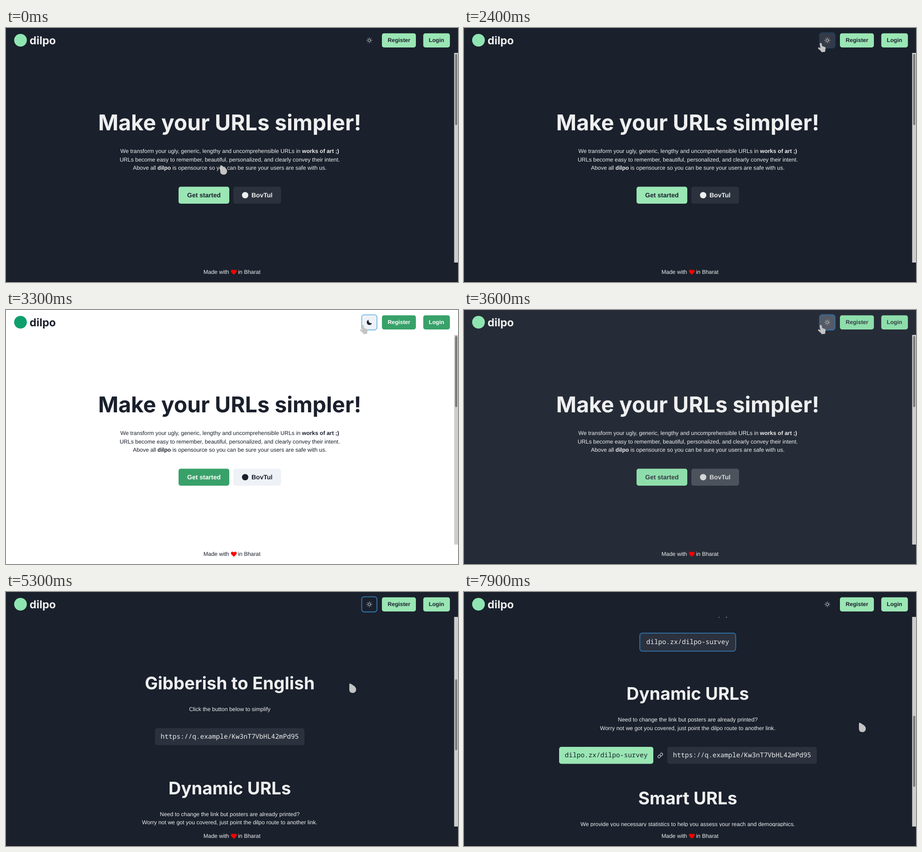
Write an HTML page that moves like this. It is 998 px wide and 561 px high and loops after 8000 ms.

```html
<!DOCTYPE html>
<html lang="en">
<head>
<meta charset="utf-8">
<title>Make your URLs simpler</title>
<style>
  html, body { margin: 0; width: 100%; height: 100%; overflow: hidden; }
  svg { display: block; width: 998px; height: 561px; background: var(--page); }
  text { font: 12.4px "Liberation Sans", Arial, sans-serif; fill: var(--ink);
         text-rendering: geometricPrecision; white-space: pre; }
  .mid { text-anchor: middle; }
  .bold { font-weight: 700; }
  .title { font: 700 38.4px Inter, sans-serif; font-optical-sizing: none; }
  .hero { font-size: 48px; }
  .brand { font-size: 24px; }
  .nav { font-size: 12.47px; font-weight: 700; }
  .cta { font-size: 14.03px; font-weight: 700; }
  .mono { font: 14.53px "Noto Sans Mono", monospace; }
  .onGreen { fill: var(--onGreen); }
  .label { fill: var(--label); }
  .green { fill: var(--green); }
  .grey { fill: #eef2f7; fill-opacity: var(--greyAlpha); }
  .line { fill: none; stroke: var(--label); stroke-linecap: round; }
  .ring { fill: none; stroke: #4299e1; stroke-width: 2.34; }
</style>
</head>
<body>
<svg viewBox="0 0 998 561">
  <defs>
    <clipPath id="view"><rect y="55" width="990" height="463"/></clipPath>
  </defs>

  <g clip-path="url(#view)">
    <g id="content">
      <text class="title hero mid" x="494" y="226">Make your URLs simpler!</text>
      <text class="mid" x="494" y="276">We transform your ugly, generic, lengthy and uncomprehensible URLs in <tspan class="bold">works of art ;)</tspan></text>
      <text class="mid" x="494" y="294.7">URLs become easy to remember, beautiful, personalized, and clearly convey their intent.</text>
      <text class="mid" x="494" y="313.4">Above all <tspan class="bold">dilpo</tspan> is opensource so you can be sure your users are safe with us.</text>
      <rect class="green" x="381" y="350.5" width="112" height="37.4" rx="4.7"/>
      <text class="cta onGreen mid" x="437" y="373.5">Get started</text>
      <rect class="grey" x="502" y="350.5" width="105.3" height="37.4" rx="4.7"/>
      <circle class="label" cx="528" cy="369.3" r="7"/>
      <text class="cta label" x="542" y="373.5">BovTul</text>

      <text class="title mid" x="494" y="565">Gibberish to English</text>
      <text class="mid" x="494" y="613">Click the button below to simplify</text>
      <rect id="linkBox" class="grey" y="651" height="37.4" rx="4.7"/>
      <rect id="linkRing" class="ring" x="388.2" y="649.8" width="211.6" height="39.8" rx="5.8"/>
      <text id="linkText" class="mono label mid" x="494" y="674"></text>

      <text class="title mid" x="494" y="797">Dynamic URLs</text>
      <text class="mid" x="494" y="845">Need to change the link but posters are already printed?</text>
      <text class="mid" x="494" y="863.7">Worry not we got you covered, just point the dilpo route to another link.</text>
      <rect class="green" x="210" y="901" width="208" height="37.4" rx="4.7"/>
      <text class="mono onGreen mid" x="314" y="924">dilpo.zx/dilpo-survey</text>
      <g class="line" transform="translate(427 913.7) scale(.53)" stroke-width="2">
        <path id="chain" d="M10 13a5 5 0 0 0 7.54.54l3-3a5 5 0 0 0-7.07-7.07l-1.72 1.71"/>
        <use href="#chain" transform="rotate(180 12 12)"/>
      </g>
      <rect class="grey" x="449" y="901" width="330" height="37.4" rx="4.7"/>
      <text class="mono label mid" x="614" y="924">https://q.example/Kw3nT7VbHL42mPd95</text>

      <text class="title mid" x="494" y="1028">Smart URLs</text>
      <text class="mid" x="494" y="1076">We provide you necessary statistics to help you assess your reach and demographics.</text>
    </g>
  </g>

  <rect x="989.5" y="55" width="8.5" height="463" fill="#cdcdcd"/>
  <rect id="thumb" x="991.7" width="4.6" height="157" rx="2.3" fill="#787878"/>

  <circle id="logo" cx="32" cy="27" r="14"/>
  <text class="title brand" x="52" y="36">dilpo</text>
  <rect id="themeHover" x="786.5" y="11.7" width="31.4" height="31.2" rx="4.7" fill="#eef2f7"/>
  <rect id="themeRing" class="ring" x="785.4" y="10.6" width="33.6" height="33.4" rx="5.6"/>
  <g id="sun" class="line" transform="translate(802.2 27.2)">
    <circle r="2.8"/>
    <path id="rays"/>
  </g>
  <path id="moon" class="label" d="M808 29.2A5.9 5.9 0 1 1 800.6 21.6A6.2 6.2 0 0 0 808 29.2Z"/>
  <rect class="green" x="830" y="11.7" width="75" height="31.2" rx="4.7"/>
  <text class="nav onGreen mid" x="867.7" y="31">Register</text>
  <rect class="green" x="921.3" y="11.7" width="58.8" height="31.2" rx="4.7"/>
  <text class="nav onGreen mid" x="950.5" y="31">Login</text>

  <text x="436" y="543">Made with</text>
  <path fill="#f00" d="M503 545L498 540.2C494.3 536.3 499 531 503 535.6C507 531 511.7 536.3 508 540.2Z"/>
  <text x="512.3" y="543">in Bharat</text>
  <rect id="edge" y="560" width="998" height="1" opacity=".35"/>

  <path id="spark" d="M2 6V2H5" fill="none" stroke="#6b1a20"/>
  <path id="cursor" fill="#c4c4c4"/>
</svg>
<script>
const LOOP = 8000;
const ARROW = "M0 2.5Q0-.7 2.8.6L10 5Q15.2 9 15.2 13.3A7.5 7.6 0 0 1 8 21Q0 21 0 13.5Z";
const HAND = "M4 2.2Q4 0 6 0Q8 0 8.4 2L9.3 7L15 8.8Q17.2 9.6 17 12L16 16.5V19.6L8 20.6L6.8 18L1 13Q-.7 11 1 9.8Q2.5 9.2 5.6 12Z";

const NAVY = [26, 32, 44], WHITE = [255, 255, 255], PALE = [238, 239, 239];
const MINT = [154, 230, 180], GREEN = [56, 161, 105];

// A move runs from its first visible step and is repainted every `step` ms.
const move = (start, duration, to, step = 100) => ({ start, duration, to, step });

const themeMoves = [move(2500, 300, 1), move(3600, 270, 0, 200)];
const themeRingMoves = [move(2400, 300, .6), move(6600, 200, 0)];
const linkRingMoves = [move(6600, 200, .6)];
const scrollMoves = [move(4400, 400, 262, 200), move(5100, 700, 393, 200), move(7900, 100, 559)];
const cursorMoves = [
  move(500, 500, [769, 255]),
  move(1100, 500, [869, 108]),
  move(1600, 400, [738, 47]),
  move(2000, 400, [781.5, 33]),
  move(4000, 200, [758, 202]),
  move(5500, 600, [613, 259], 200),
  move(6100, 200, [589.5, 272.5]),
  move(7300, 100, [872, 288.5])
];

const lerp = (a, b, k) => a + (b - a) * k;
const mix = (dark, light, k) => `rgb(${dark.map((c, i) => Math.round(lerp(c, light[i], k)))})`;
const easeOut = power => p => 1 - (1 - p) ** power;
const during = (t, from, to) => t >= from && t < to;

function follow(t, moves, from, ease = easeOut(1.32)) {
  return moves.filter(m => t >= m.start).reduce((value, m) => {
    const steps = Math.floor((t - m.start) / m.step) + 1;
    const k = ease(Math.min(1, steps * m.step / m.duration));
    return Array.isArray(value)
      ? value.map((v, i) => lerp(v, m.to[i], k))
      : lerp(value, m.to, k);
  }, from);
}

const root = document.querySelector("svg");
const el = id => document.getElementById(id);
const set = (id, attrs) => {
  for (const name in attrs) el(id).setAttribute(name, attrs[name]);
};

el("rays").setAttribute("d", Array.from({ length: 8 }, (_, i) => {
  const x = Math.cos(i * Math.PI / 4), y = Math.sin(i * Math.PI / 4);
  return `M${x * 4.8} ${y * 4.8}L${x * 5.9} ${y * 5.9}`;
}).join(""));

function drawTheme(t) {
  const page = follow(t, themeMoves, 0, easeOut(2.18));
  const button = follow(t, themeMoves, 0, easeOut(1.56));
  const light = during(t, 2500, 3600);
  const colors = {
    page: mix(NAVY, WHITE, page),
    ink: mix(PALE, NAVY, +light),
    label: mix(PALE, NAVY, button),
    green: mix(MINT, GREEN, button),
    onGreen: mix(NAVY, WHITE, button),
    greyAlpha: lerp(.08, 1, button)
  };
  for (const name in colors) root.style.setProperty("--" + name, colors[name]);

  set("logo", { fill: light ? "#0e9f6e" : "#8fe5b2" });
  for (const id of ["sun", "edge"]) el(id).style.display = light ? "none" : "";
  el("moon").style.display = light ? "" : "none";
  set("themeHover", { opacity: during(t, 2200, 4000) ? lerp(.13, 1, button) : 0 });
  set("themeRing", { opacity: follow(t, themeRingMoves, 0) });
}

function drawPage(t) {
  const scroll = follow(t, scrollMoves, 0);
  set("content", { transform: `translate(0 ${-scroll})` });
  set("thumb", { y: 57.5 + scroll * .386 });

  const short = t >= 6600;
  const width = short ? 209 : 330;
  set("linkBox", { x: 494 - width / 2, width });
  el("linkBox").style.fillOpacity =
    during(t, 6600, 6700) ? .22 : during(t, 6100, 7300) ? .16 : "";
  el("linkText").textContent = short
    ? "dilpo.zx/dilpo-survey"
    : "https://q.example/Kw3nT7VbHL42mPd95";
  set("linkRing", { opacity: follow(t, linkRingMoves, 0) });
}

function drawCursor(t) {
  const hand = during(t, 2200, 4000) || during(t, 6100, 7300);
  const clicked = during(t, 2400, 2500) || during(t, 6700, 7000);
  const place = follow(t, cursorMoves, [473, 303], easeOut(1));
  set("cursor", { d: hand ? HAND : ARROW, transform: `translate(${place})` });
  set("spark", { opacity: +clicked });
}

const start = performance.now();
function tick() {
  const t = (performance.now() - start) % LOOP;
  drawTheme(t);
  drawPage(t);
  drawCursor(t);
  requestAnimationFrame(tick);
}
tick();
</script>
</body>
</html>
```
